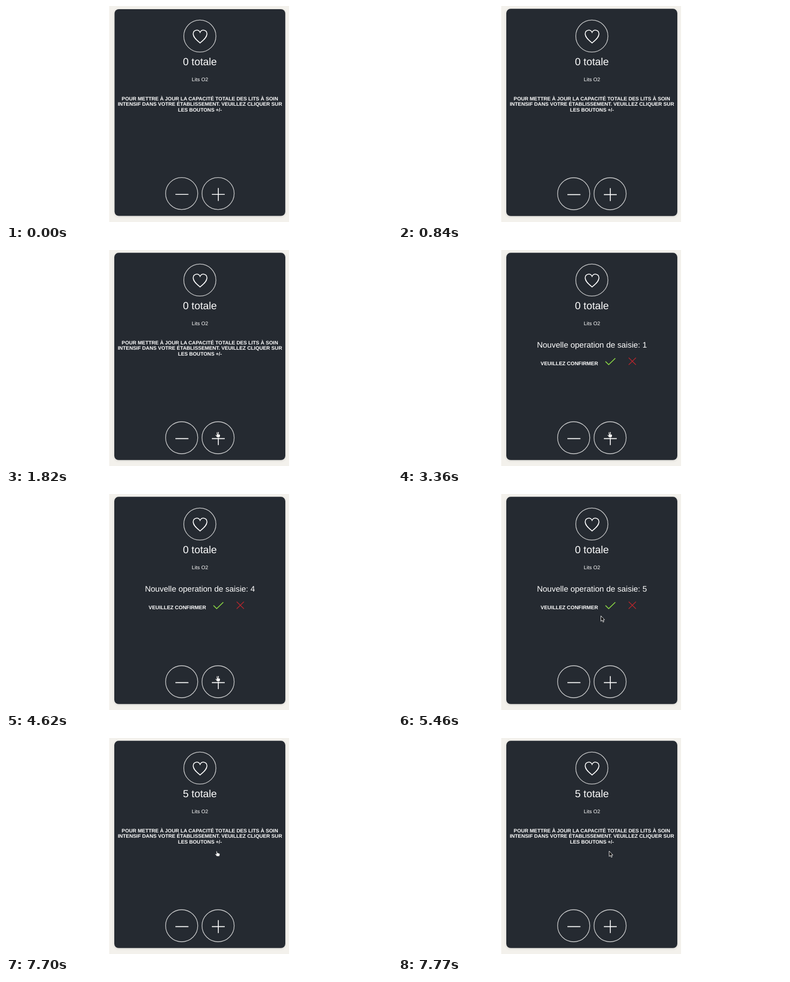
Write an HTML page that moves like this. It is 720 px wide and 405 px high and loops after 8000 ms.

```html
<!DOCTYPE html>
<html lang="fr">
<head>
<meta charset="utf-8">
<style>
  html, body { margin: 0; width: 100%; height: 100%; overflow: hidden; background: #fff; }
  svg { display: block; width: 100vw; height: 100vh; }
  text {
    font-family: "Liberation Sans", Arial, sans-serif;
    fill: #fff; text-anchor: middle; text-rendering: geometricPrecision;
  }
  .small { font-size: 9.45px; font-weight: bold; }
  .line { fill: none; stroke: #fff; stroke-width: 1.6; }
  .ring { fill: none; stroke: #cbcccd; stroke-width: 1.3; }
  #card { fill: #252a31; filter: drop-shadow(0 1px 2px #0002); }
</style>
</head>
<body>
<svg viewBox="0 0 720 405">
  <rect x="192.5" width="335.5" height="405" fill="#f3f1ec"/>
  <rect id="card" rx="8"/>

  <circle class="ring" cx="361.6" cy="56.4" r="30"/>
  <path class="line" d="M362 69.3C357 65 349.2 59.5 349.2 52.3C349.2 44.5 359 42.8 362 49.5C365 42.8 374.8 44.5 374.8 52.3C374.8 59.5 367 65 362 69.3Z"/>
  <text id="total" x="361.6" y="111" font-size="19.3"></text>
  <text x="361.8" y="140.6" font-size="9.6">Lits O2</text>

  <g id="help" class="small">
    <text x="361.7" y="176.5">POUR METTRE À JOUR LA CAPACITÉ TOTALE DES LITS À SOIN</text>
    <text x="361.7" y="187.4">INTENSIF DANS VOTRE ÉTABLISSEMENT. VEUILLEZ CLIQUER SUR</text>
    <text x="361.7" y="198.3">LES BOUTONS +/-</text>
  </g>

  <g id="confirm">
    <text id="entry" x="361.7" y="183.3" font-size="15"></text>
    <text class="small" x="319.6" y="215.8" style="font-size:9.6px">VEUILLEZ CONFIRMER</text>
    <path class="line" style="stroke:#8fdf45" d="M387 209L393 215L405.3 203"/>
    <path class="line" style="stroke:#b5272d;stroke-width:1.4" d="M430.3 202L443.8 215.2M443.8 202L430.3 215.2"/>
  </g>

  <g id="buttons">
    <circle class="ring" cx="327.7" cy="352" r="30"/>
    <circle class="ring" cx="395.6" cy="352" r="30"/>
    <path class="line" d="M316 353.6H340.3M384 353.6H408M396 341.6V365.8"/>
  </g>

  <path id="arrow" fill="#000" stroke="#fff" stroke-width=".9" stroke-linejoin="round"
    d="M.5 .5V10.6L2.8 8.5L4.5 12.2L6.1 11.5L4.5 8H7.4Z"/>
  <path id="hand" fill="#fff" stroke="#111418" stroke-width=".7" stroke-linejoin="round"
    d="M-1.4 1Q-.6-.5 .3 1L1 4.2Q2 3.4 2.6 4.5Q3.7 3.8 4.2 5Q5.6 4.6 5.6 6.2Q5.5 8.2 4.6 10.4H-.3Q-1.6 8.2-3.6 6.6Q-3.8 5.2-2 5.8L-.9 6.6Z"/>
</svg>
<script>
const LOOP = 8000, STEP = 70;
const $ = id => document.getElementById(id);
const show = (id, on) => $(id).setAttribute("display", on ? "inline" : "none");

// Pointer tip: time, x, y
const path = [
  [1120, 444, 319], [1260, 422, 326], [1400, 401, 337], [1540, 394, 341],
  [5250, 394, 341], [5320, 391, 318], [5390, 383, 266], [5460, 378, 228],
  [5740, 383, 222], [6090, 393.4, 211.5]
];

function tipAt(t) {
  const i = path.findIndex(p => p[0] > t);
  if (i < 0) return path.at(-1).slice(1);
  const [a, b] = [path[i - 1], path[i]];
  const k = (t - a[0]) / (b[0] - a[0]);
  return [a[1] + k * (b[1] - a[1]), a[2] + k * (b[2] - a[2])];
}

function drawPointer(t) {
  const visible = t >= path[0][0];
  const [x, y] = visible ? tipAt(t) : [0, 0];
  const overPlus = Math.hypot(x - 395.6, y - 352) < 30;
  const overCheck = t < 7770 && x > 386 && y < 218;
  const hand = overPlus || overCheck;
  show("hand", visible && hand);
  show("arrow", visible && !hand);
  $(hand ? "hand" : "arrow").setAttribute("transform", `translate(${x} ${y})`);
}

function draw(now) {
  const t = Math.floor(now % LOOP / STEP) * STEP;
  const settled = t >= 840;
  const box = settled ? [202, 5.3, 319, 388.5] : [202.5, 6, 318.4, 387.5];
  ["x", "y", "width", "height"].forEach((name, i) => $("card").setAttribute(name, box[i]));
  $("buttons").setAttribute("transform", `translate(0 ${settled ? 0 : -.4})`);

  const confirming = t >= 3360 && t < 7700;
  const count = Math.min(5, 1 + Math.floor((t - 3360) / 420));
  show("confirm", confirming);
  show("help", !confirming);
  $("entry").textContent = `Nouvelle operation de saisie: ${count}`;
  $("total").textContent = `${t < 7700 ? 0 : 5} totale`;
  drawPointer(t);
}

const start = performance.now();
function tick() {
  draw(performance.now() - start);
  requestAnimationFrame(tick);
}
tick();
</script>
</body>
</html>
```
